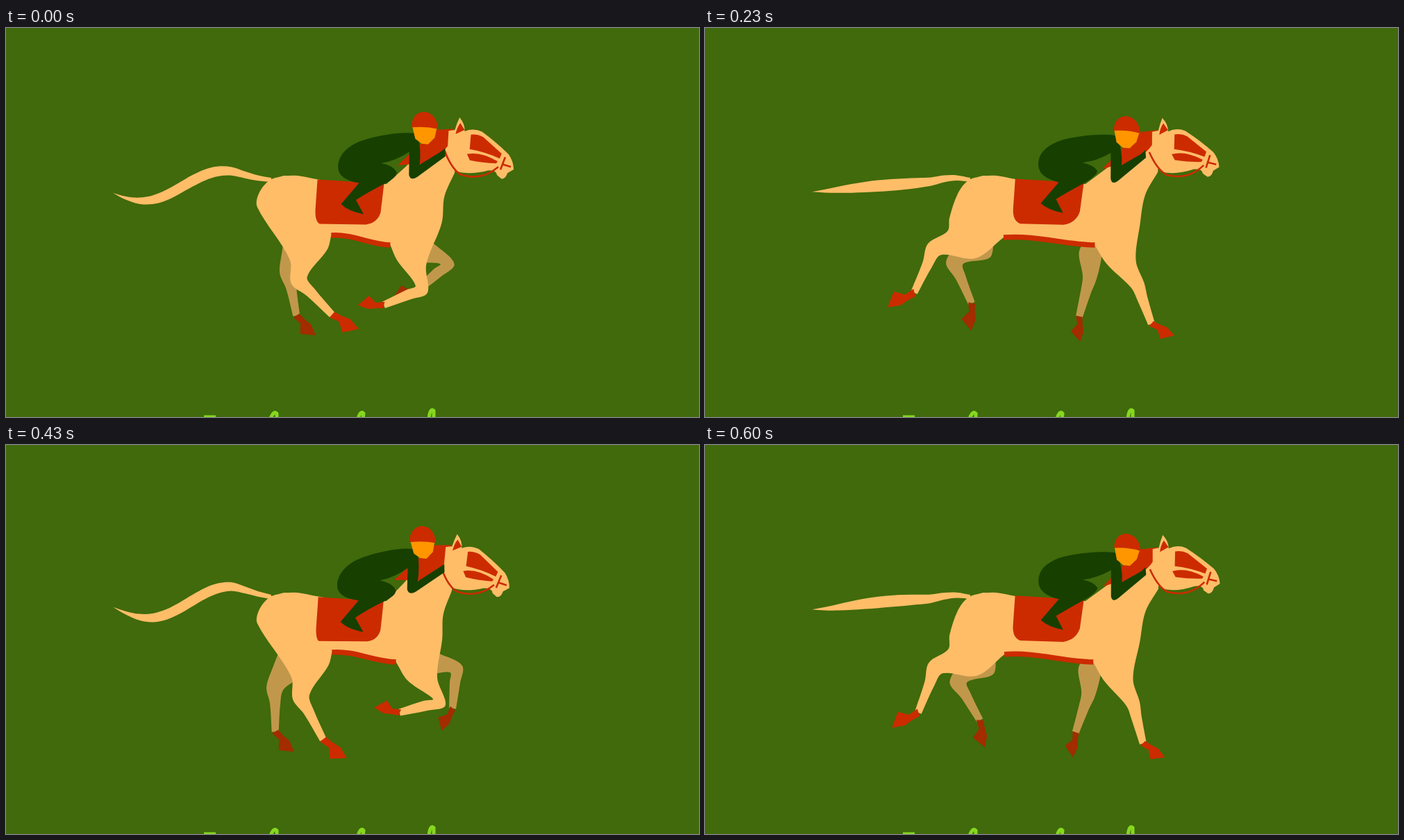
An HTML page with a canvas for the animation above (0.63 s loop, 998x561 px).

```html
<!DOCTYPE html>
<html lang="en">
<head>
<meta charset="utf-8">
<title>Galloping horse</title>
<style>
  html, body { margin: 0; width: 100%; height: 100%; overflow: hidden; background: #406a0b; }
  canvas { display: block; }
</style>
</head>
<body>
<canvas id="stage" width="998" height="561"></canvas>
<script>
const ctx = document.getElementById('stage').getContext('2d');
const LOOP = 630, STRIDE = 9;
const C = {
  grass: '#406a0b', coat: '#ffbd68', shade: '#c1984b', red: '#cc2b00',
  darkRed: '#a32c00', silk: '#173f00', skin: '#ff9600', letter: '#86d81f'
};

// Joint angles in degrees, down from the right: mean, swing, phase of the peak, double-beat swing.
// back and front place the edges of the upper leg: turn from the bone and share of its length.
const HIND = {
  upper: [116, 32, 5, 0], lower: [83, 37, 4.2, 10], hoof: [75, 55, 5.3, 22],
  back: [9, .71], front: [-36, .73], joint: 12.5
};
const FORE = {
  upper: [66, 34, 7.6, 0], lower: [98, 60, 0, 18], hoof: [95, 88, .4, 12],
  back: [31, .63], front: [-9, .65], joint: 10
};
const LEGS = {
  nearHind: { ...HIND, hip: [415, 262], bones: [102, 69], lead: 0, swing: 1 },
  farHind: { ...HIND, hip: [408, 262], bones: [91, 63], lead: 1.45, swing: 1 },
  nearFore: { ...FORE, hip: [590, 280], bones: [97, 59], lead: 0, swing: 1 },
  farFore: { ...FORE, hip: [578, 285], bones: [80, 57], lead: 1.6, swing: 1.3 }
};

// Shapes that follow the nod: highest and lowest form.
const PAD = [
  'M451,220 L543,226 Q541,250 539,268 Q536,281 522,283 L449,283 Q447,280 448,262 Z',
  'M446,217 L546,223 Q542,250 540,264 Q534,281 515,284 L455,282 Q442,278 443,260 Z'
];
const MANE = [
  'M553,191 L576,172 L614,142 L636,143 Q636,160 622,178 L598,196 L572,193 Z',
  'M576,206 L594,185 L626,152 L654,148 Q652,168 636,180 L608,197 L590,200 Z'
];
const RIDER = [
  'M588,148 C565,145 525,156 505,166 C485,176 474,194 476,208 Q478,222 507,225 L481,256 Q490,266 514,271 L502,250 Q520,237 545,226 Q558,220 560,213 Q558,200 536,196 Q560,190 576,176 L575,204 Q577,213 588,208 L630,182 L630,170 L620,176 L590,196 Q594,170 592,156 Z',
  'M590,156 C565,153 530,157 512,162 C490,170 480,180 481,198 Q483,215 510,222 L484,252 Q495,262 516,266 L506,246 Q525,235 548,222 Q565,212 566,205 Q560,197 545,194 Q565,192 586,181 L586,220 Q588,230 597,222 L636,188 L635,177 L629,183 L602,198 Q603,178 594,158 Z'
];
const FACE = [
  'M579,134 L614,134 L612,150 L603,160 L594,159 L585,153 Z',
  'M591,148 L628,153 L623,167 L613,176 L603,175 L594,167 Z'
];
const CAP = [
  'M578,137 C577,105 615,104 616,137 Q597,134 578,137 Z',
  'M591,150 C590,122 627,123 629,155 Q612,149 591,150 Z'
];

const HEAD = new Path2D('M636,147 L645,146 Q648,136 652,128 Q660,138 659,148 Q672,143 684,149 Q704,164 722,182 Q729,192 729,204 L720,209 Q717,218 711,217 L705,212 Q704,204 692,205 Q664,212 645,205 Q630,190 634,175 Z');
const MARKS = new Path2D('M646,152 Q648,142 653,136 L659,146 Z M668,153 Q678,152 686,157 L712,181 L709,188 Q688,178 666,174 Z M662,181 Q682,177 706,192 L704,195 Q684,194 666,190 Z');
const REINS = new Path2D('M630,176 Q639,201 652,210 Q682,221 707,200 M717,186 L710,204 M712,196 L725,200');
const LETTERS = new Path2D('M285,561 H302 M381,563 Q386,551 390,556 L390,563 M507,563 Q511,551 515,556 L514,563 M609,563 Q611,547 616,552 L616,563');
const HOOF = [[-.04, .12], [.3, .09], [.57, .36], [1, 0], [.6, -.15], [.3, -.12], [.02, -.13]];

const lerp = (a, b, k) => a + (b - a) * k;
const dist = (a, b) => Math.hypot(b[0] - a[0], b[1] - a[1]) || 1e-6;
const rad = deg => deg * Math.PI / 180;
const polar = (p, deg, r) => [p[0] + Math.cos(rad(deg)) * r, p[1] + Math.sin(rad(deg)) * r];
const beat = u => Math.cos(2 * Math.PI * u / STRIDE);
const wave = ([mean, amp, peak, amp2], u, swing = 1) =>
  mean + amp * swing * beat(u - peak) + amp2 * beat(2 * (u - 1.15));

// The gallop slows towards the tenth picture, then runs on evenly.
const phaseAt = step => step - 3.3 * Math.min(1, step / 10) ** 2.25;

function morph([a, b], k) {
  const ends = b.match(/[\d.]+/g);
  let i = 0;
  return new Path2D(a.replace(/[\d.]+/g, x => lerp(+x, +ends[i++], k).toFixed(2)));
}

// Continues a path with a smooth curve through the points.
function curve(path, pts) {
  const last = pts.length - 1;
  const tangent = i => {
    const p = pts[Math.max(i - 1, 0)], q = pts[Math.min(i + 1, last)];
    const d = (i > 0 ? dist(p, pts[i]) : 0) + (i < last ? dist(pts[i], q) : 0);
    return [(q[0] - p[0]) / d, (q[1] - p[1]) / d];
  };
  path.lineTo(...pts[0]);
  for (let i = 0; i < last; i++) {
    const [a, b] = [pts[i], pts[i + 1]], d = dist(a, b) / 3;
    const [s, e] = [tangent(i), tangent(i + 1)];
    path.bezierCurveTo(a[0] + s[0] * d, a[1] + s[1] * d, b[0] - e[0] * d, b[1] - e[1] * d, ...b);
  }
}

function fill(path, color) {
  ctx.fillStyle = color;
  ctx.fill(path);
}

function line(path, width, color) {
  ctx.lineWidth = width;
  ctx.strokeStyle = color;
  ctx.stroke(path);
}

// Bones of one leg and the two edges of its outline.
function poseLeg(leg, u) {
  const v = u + leg.lead, [long, short] = leg.bones;
  const upper = wave(leg.upper, v, leg.swing), lower = wave(leg.lower, v);
  const joint = polar(leg.hip, upper, long), foot = polar(joint, lower, short);
  const shin = polar(joint, lower, short * .35), bend = (upper + lower) / 2;
  const edge = ([turn, share], side) => [
    polar(leg.hip, upper + turn, long * share),
    polar(joint, bend + 90 * side, leg.joint),
    polar(shin, lower + 90 * side, 7.5),
    polar(foot, lower + 90 * side, 5)
  ];
  return {
    upper, foot,
    back: edge(leg.back, 1),
    front: edge(leg.front, -1).reverse(),
    toe: polar(foot, wave(leg.hoof, v), short * .63)
  };
}

function hoof({ foot, toe }, color) {
  const dx = toe[0] - foot[0], dy = toe[1] - foot[1], path = new Path2D();
  for (const [a, b] of HOOF) path.lineTo(foot[0] + dx * a - dy * b, foot[1] + dy * a + dx * b);
  fill(path, color);
}

function farLeg(leg, u) {
  const pose = poseLeg(leg, u), path = new Path2D();
  curve(path, [leg.hip, ...pose.back]);
  curve(path, [...pose.front, leg.hip]);
  fill(path, C.shade);
  hoof(pose, C.darkRed);
}

// A wave runs along the tail from the root to the tip.
function tail(u) {
  const top = [], under = [], path = new Path2D();
  for (let i = 0; i <= 12; i++) {
    const s = i / 12, x = 382 - 228 * s;
    const y = 219 + 15 * s - 10 * Math.sin(2 * Math.PI * s) +
      9 * Math.min(1, 4 * s) * beat(u - 8.1 + 9.7 * s);
    const half = 3 * (1 - s) + 7 * Math.sin(Math.PI * s ** 1.2);
    top.push([x, y - half]);
    under.unshift([x, y + half]);
  }
  curve(path, top);
  curve(path, under);
  fill(path, C.coat);
}

function body(hind, fore, k) {
  const at = (x1, y1, x2, y2) => [lerp(x1, x2, k), lerp(y1, y2, k)];
  const s = (hind.upper - 85) / 61;
  const rump = [362 - 10 * s, 258 + 16 * s], groin = [469 - 39 * s, 299 + 3 * s];
  const end = [581 - (fore.upper - 33) * .53, 313];
  const reach = (end[0] - groin[0]) * .35;
  const belly = [groin[0] + reach, groin[1] - reach * .08, end[0] - reach, end[1] - 1, ...end];

  const path = new Path2D();
  curve(path, [[400, 213], [379, 220], [364, 239], rump, ...hind.back]);
  curve(path, [...hind.front, groin]);
  path.bezierCurveTo(...belly);
  curve(path, [end, ...fore.back]);
  curve(path, [...fore.front, at(629, 278, 626, 284), at(628, 246, 635, 240), at(638, 210, 655, 207)]);
  path.lineTo(...at(638, 150, 655, 150));
  path.lineTo(...at(615, 146, 630, 152));
  path.lineTo(...at(570, 198, 584, 200));
  curve(path, [[548, 225], [500, 226], [447, 218], [420, 213], [400, 213]]);
  fill(path, C.coat);

  const girth = new Path2D();
  girth.moveTo(...groin);
  girth.bezierCurveTo(...belly);
  line(girth, 7.5, C.red);
}

function head(k) {
  ctx.save();
  ctx.translate(646 + 15 * k, 128 + 2 * k);
  ctx.rotate(rad(3.6 - 8.8 * k));
  ctx.translate(-652, -128);
  fill(HEAD, C.coat);
  fill(MARKS, C.red);
  line(REINS, 2.6, C.red);
  ctx.restore();
}

function draw(u) {
  const nod = .5 + .5 * beat(u - 6.7);
  const hind = poseLeg(LEGS.nearHind, u), fore = poseLeg(LEGS.nearFore, u);
  ctx.fillStyle = C.grass;
  ctx.fillRect(0, 0, 998, 561);
  line(LETTERS, 5, C.letter);

  farLeg(LEGS.farHind, u);
  farLeg(LEGS.farFore, u);
  tail(u);
  body(hind, fore, nod);
  hoof(hind, C.red);
  hoof(fore, C.red);

  fill(morph(PAD, nod), C.red);
  fill(morph(MANE, nod), C.red);
  head(nod);
  fill(morph(RIDER, nod), C.silk);
  fill(morph(FACE, nod), C.skin);
  fill(morph(CAP, nod), C.red);
}

const start = performance.now();
function tick(now) {
  const t = Math.max(0, now - start) % LOOP;
  // Thirty pictures a second, on a clock of 10 ms.
  const step = Math.floor((Math.floor(t / 10) * 10 + 5) / 33.34);
  draw(phaseAt(step));
  requestAnimationFrame(tick);
}
draw(0);
requestAnimationFrame(tick);
</script>
</body>
</html>
```
